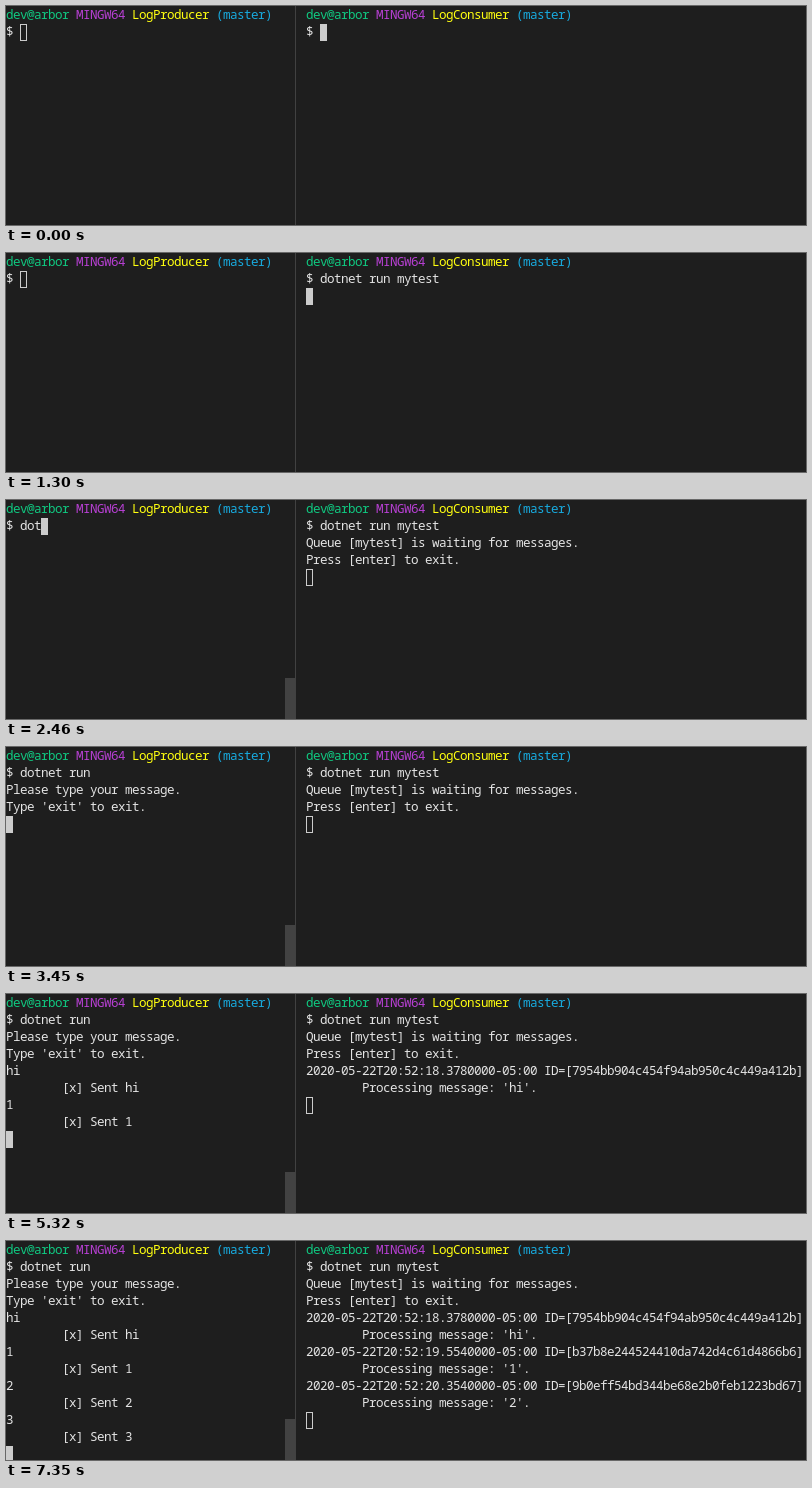
An HTML page with a canvas that plays this animation: 800x219 px, repeating every 8 s.

```html
<!DOCTYPE html>
<html lang="en">
<head>
<meta charset="utf-8">
<title>Log producer and consumer</title>
<style>
  html, body { margin: 0; width: 800px; height: 219px; overflow: hidden; background: #1e1e1e; }
  canvas { display: block; }
</style>
</head>
<body>
<canvas id="stage" width="800" height="219"></canvas>
<script>
const ctx = document.getElementById('stage').getContext('2d');
const LOOP = 8000, CELL = 7, LINE = 17, FOCUS_SWITCH = 2150;
const TEXT = '#e4e4e4', CURSOR = '#cccccc';

// Events append text to a pane: [time, text]
const typing = (text, times, counts) =>
  times.map((t, i) => [t, text.slice(i ? counts[i - 1] : 0, counts[i])]);

const sent = msg => `\n        [x] Sent ${msg}\n`;
const received = (time, id, msg) =>
  `2020-05-22T20:52:${time}0000-05:00 ID=[${id}]\n        Processing message: '${msg}'.\n`;

const producer = {
  x: 0, name: 'LogProducer',
  events: [
    ...typing('dotnet run',
      [2300, 2380, 2460, 2540, 2615, 2690, 2760, 2835],
      [1, 2, 3, 4, 5, 7, 8, 10]),
    [2910, '\n'],
    [3450, "Please type your message.\nType 'exit' to exit.\n"],
    [4060, 'hi'], [4230, sent('hi')],
    [5090, '1'], [5320, sent('1')],
    [5870, '2'], [6170, sent('2')],
    [6720, '3'], [6870, sent('3')]
  ]
};

const consumer = {
  x: 300, name: 'LogConsumer',
  events: [
    ...typing('dotnet run mytest',
      [230, 310, 460, 535, 610, 685, 760, 835, 910, 985, 1060, 1135, 1210],
      [1, 3, 4, 5, 6, 8, 9, 10, 11, 13, 14, 15, 17]),
    [1300, '\n'],
    [1610, 'Queue [mytest] is waiting for messages.\nPress [enter] to exit.\n'],
    [4230, received('18.378', '7954bb904c454f94ab950c4c449a412b', 'hi')],
    [5400, received('19.554', 'b37b8e244524410da742d4c61d4866b6', '1')],
    [7350, received('20.354', '9b0eff54bd344be68e2b0feb1223bd67', '2')]
  ]
};

// Every character sits in its own terminal cell, slightly narrower than its advance
function write(text, x, row, color) {
  ctx.fillStyle = color;
  [...text].forEach((ch, i) => ctx.fillText(ch, x + i * CELL, 13 + row * LINE));
}

function drawPrompt(pane) {
  const parts = [
    ['dev@arbor', '#10c880'], ['MINGW64', '#b840d4'],
    [pane.name, '#ffff10'], ['(master)', '#18aade']
  ];
  let x = pane.x;
  for (const [word, color] of parts) {
    write(word, x, 0, color);
    x += (word.length + 1) * CELL;
  }
}

function drawPane(pane, t, focused) {
  drawPrompt(pane);
  const shown = pane.events.filter(([at]) => at <= t).map(([, text]) => text);
  const lines = ('$ ' + shown.join('')).split('\n');
  lines.forEach((line, i) => write(line, pane.x, i + 1, TEXT));

  const x = pane.x + lines[lines.length - 1].length * CELL;
  const y = 1 + lines.length * LINE;
  ctx.fillStyle = ctx.strokeStyle = CURSOR;
  if (focused) ctx.fillRect(x, y, CELL, LINE);
  else ctx.strokeRect(x + 0.5, y + 0.5, CELL - 1, LINE - 1);
}

function draw(t) {
  ctx.fillStyle = '#1e1e1e';
  ctx.fillRect(0, 0, 800, 219);
  ctx.font = '12.6px "Noto Sans Mono", monospace';
  ctx.lineWidth = 1;

  const leftFocused = t >= FOCUS_SWITCH;
  drawPane(producer, t, leftFocused);
  drawPane(consumer, t, !leftFocused);

  ctx.fillStyle = '#414141';
  ctx.fillRect(289, 0, 1, 219);
  ctx.globalAlpha = Math.min(1, Math.max(0, (t - FOCUS_SWITCH) / 100));
  ctx.fillStyle = '#424242';
  ctx.fillRect(279, 178, 10, 41);
  ctx.globalAlpha = 1;
}

const start = performance.now();
function tick() {
  draw((performance.now() - start) % LOOP);
  requestAnimationFrame(tick);
}
tick();
</script>
</body>
</html>
```
